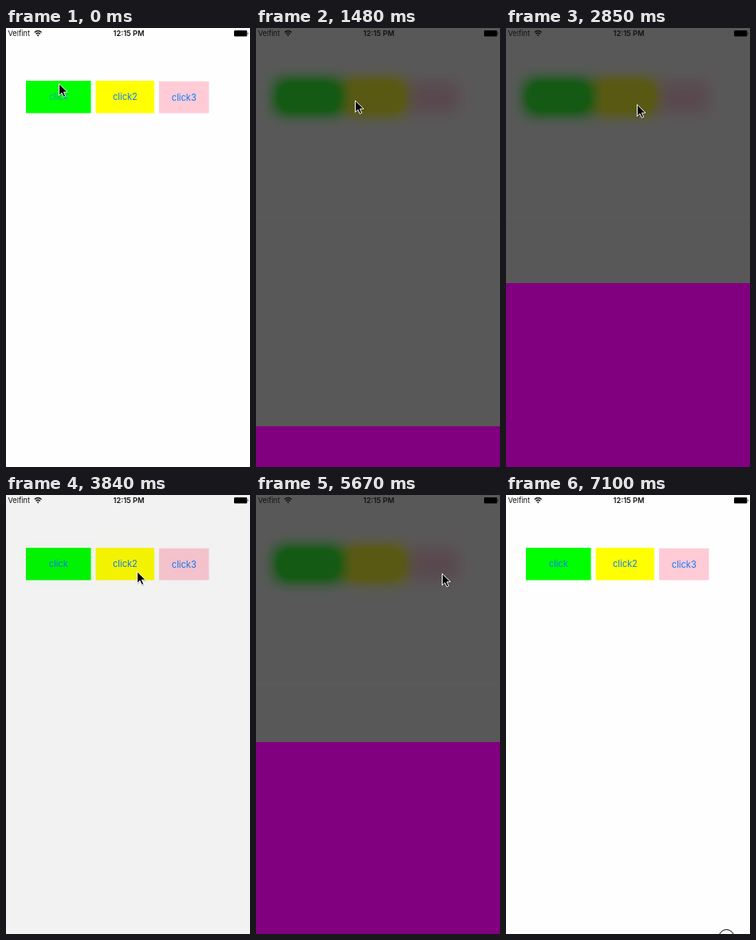
These frames come from a looping animation (306 by 549 pixels, 7150 ms). An HTML page:

```html
<!DOCTYPE html>
<html lang="en">
<head>
<meta charset="utf-8">
<title>Popup panel</title>
<style>
  html, body { margin: 0; width: 100%; height: 100%; overflow: hidden; background: #fefefe; }
  svg { display: block; width: 306px; height: 549px; }
  text { font-family: Inter, Roboto, sans-serif; }
  .label { font-size: 11.1px; fill: #0a7aff; text-anchor: middle; }
  .status { font-size: 9.2px; fill: #111; }
</style>
</head>
<body>
<svg viewBox="0 0 306 549" xmlns="http://www.w3.org/2000/svg">
  <defs>
    <filter id="frost" filterUnits="userSpaceOnUse" x="-60" y="-60" width="426" height="300" color-interpolation-filters="sRGB">
      <feGaussianBlur stdDeviation="9.5"/>
      <feColorMatrix type="saturate" values="1.8"/>
    </filter>
  </defs>

  <rect width="306" height="549" fill="#fefefe"/>
  <g id="boxes">
    <rect x="25" y="66" width="81.5" height="40.5" fill="#00ff00"/>
    <rect x="112.5" y="66" width="73.5" height="40.5" fill="#ffff00"/>
    <rect x="192" y="66.7" width="62.5" height="39.8" fill="#ffcbd6"/>
  </g>
  <g id="labels">
    <text class="label" x="65.7" y="90.2">click</text>
    <text class="label" x="149.4" y="90.2">click2</text>
    <text class="label" x="223.3" y="90.6">click3</text>
  </g>

  <g id="veil" opacity="0">
    <rect width="306" height="549" fill="#fefefe"/>
    <g filter="url(#frost)">
      <rect x="-60" y="-60" width="426" height="300" fill="#fefefe"/>
      <use href="#boxes"/>
    </g>
    <rect width="306" height="549" fill="#1c1c1c" opacity=".73"/>
  </g>
  <rect id="panel" y="549" width="306" height="240" fill="#800080"/>

  <g>
    <text class="status" x="2.5" y="10">Velfint</text>
    <g fill="none" stroke="#111" stroke-width="1.4">
      <path d="M35.8 5.6Q40.2 1.6 44.6 5.6"/>
      <path d="M37.5 7.5Q40.2 5.1 42.9 7.5"/>
    </g>
    <path d="M38.7 8.8Q40.2 7.6 41.7 8.8L40.2 10.5Z" fill="#111"/>
    <text class="status" x="154" y="10" text-anchor="middle" font-weight="600">12:15 PM</text>
    <rect x="286" y="3" width="16.4" height="7.6" rx="1.4" fill="#000"/>
    <path d="M303 5.2Q304.6 6.8 303 8.4Z" fill="#000"/>
  </g>

  <circle id="ring" cx="276.5" cy="553" r="9.5" fill="#fefefe" stroke="#000"/>
  <g id="cursor">
    <path d="M1 2V17L4.5 13.8 7 19 9.4 18 7.2 12.8H12Z" fill="#000" opacity=".2"/>
    <path d="M.5 .8V15.4L3.9 12.2 6.3 17.4 8.7 16.3 6.4 11.2H11Z" fill="#000" stroke="#fff"/>
  </g>
</svg>
<script>
const LOOP = 7150, DUR = 240, STAGE_H = 549, PANEL_H = 240;
const $ = id => document.getElementById(id);
const veil = $('veil'), panel = $('panel'), cursor = $('cursor'), ring = $('ring');
const labels = $('labels').children;

// One popup per button; dim is the label's opacity while pressed
const popups = [
  { press: 0, open: 420, close: 1312, dim: .6 },
  { press: 2380, open: 2490, close: 3413, dim: .2 },
  { press: 4560, open: 4597, close: 5787, dim: .2 }
];

// Pointer moves: start, end, x, y
const home = [66, 69];
const moves = [
  [700, 1120, 124, 90],
  [1960, 2140, 164, 95],
  [3900, 4200, 233, 97.5],
  [6140, 6370, 274, 268],
  [6370, 6710, 290, 511]
];

const clamp = x => Math.min(1, Math.max(0, x));
const smooth = x => x * x * (3 - 2 * x);
const ramp = (t, start) => smooth(clamp((t - start) / DUR));

function pointerAt(t) {
  let [x, y] = home;
  for (const [start, end, toX, toY] of moves) {
    const f = clamp((t - start) / (end - start));
    x += (toX - x) * f;
    y += (toY - y) * f;
  }
  return [x, y];
}

function draw(t) {
  let shade = 0, rise = 0;
  popups.forEach(({ press, open, close, dim }, i) => {
    // The veil leads on the way in and trails on the way out
    shade += ramp(t, open) - ramp(t, close + 226);
    rise += ramp(t, open + 150) - ramp(t, close);
    const lit = t < press ? 1 : dim + (1 - dim) * ramp(t, open + 40);
    labels[i].setAttribute('opacity', lit);
  });
  veil.setAttribute('opacity', shade);
  panel.setAttribute('y', Math.round(STAGE_H - PANEL_H * rise));
  cursor.setAttribute('transform', `translate(${pointerAt(t)})`);
  cursor.setAttribute('visibility', t < 6770 ? 'visible' : 'hidden');
  ring.setAttribute('visibility', t >= 7100 ? 'visible' : 'hidden');
}

const begin = performance.now();
function tick() {
  draw((performance.now() - begin) % LOOP);
  requestAnimationFrame(tick);
}
tick();
</script>
</body>
</html>
```
